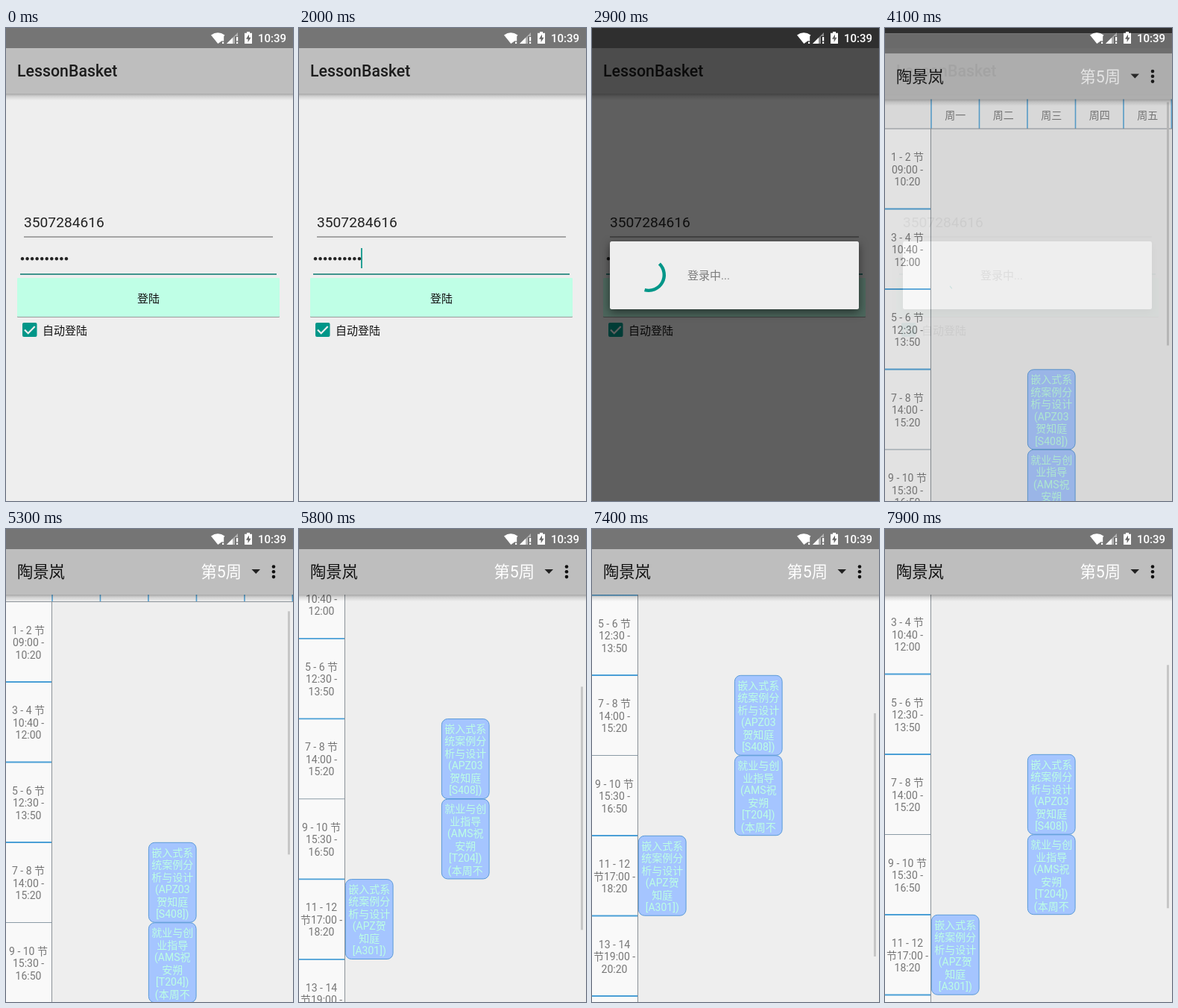
These frames come from a looping animation (385x634 px, 8000 ms). An HTML page:

```html
<!DOCTYPE html>
<html lang="zh-CN">
<head>
<meta charset="utf-8">
<style>
  html, body { margin: 0; width: 100%; height: 100%; overflow: hidden; background: #eee; }
  svg { display: block; width: 100vw; height: 100vh; }
  text { font-family: Roboto, "Noto Sans CJK SC", "Noto Sans CJK", sans-serif; white-space: pre; }
  .label { font-size: 14px; fill: #777; text-anchor: middle; }
  .course { font-size: 14px; fill: #bcffe4; text-anchor: middle; }
  #dialog > rect { filter: drop-shadow(0 4px 6px rgba(0, 0, 0, .5)); }
</style>
</head>
<body>
<svg viewBox="0 0 385 634" xmlns="http://www.w3.org/2000/svg">
  <defs>
    <linearGradient id="shade" x2="0" y2="1">
      <stop offset="0" stop-color="#000" stop-opacity=".3"/>
      <stop offset=".4" stop-color="#000" stop-opacity=".12"/>
      <stop offset="1" stop-color="#000" stop-opacity="0"/>
    </linearGradient>
    <g id="bars">
      <rect width="385" height="27" fill="#757575"/>
      <rect y="27" width="385" height="61" fill="#bebebe"/>
      <rect y="88" width="385" height="9" fill="url(#shade)"/>
    </g>
  </defs>

  <g id="login">
    <rect width="385" height="634" fill="#eee"/>
    <use href="#bars"/>
    <text x="15" y="65" font-size="21.3" font-weight="500" fill="#1c1c1c">LessonBasket</text>
    <text x="24" y="267" font-size="19.2" fill="#222">3507284616</text>
    <path d="M24 280H358" stroke="#8c8c8c" stroke-width="1.3"/>
    <g id="dots" fill="#222"></g>
    <path d="M19 330H363" stroke="#3f958d" stroke-width="2"/>
    <rect id="cursor" x="83" y="295" width="2" height="27" fill="#26a095"/>
    <rect id="button" x="15" y="335" width="352" height="52" rx="1" fill="#bfffe6"/>
    <text x="191" y="367.5" font-size="15" text-anchor="middle" fill="#111">登陆</text>
    <rect x="22" y="395" width="19.5" height="19" rx="2" fill="#009688"/>
    <path d="M25 404.5l4.7 4.7 9-9.2" fill="none" stroke="#eee" stroke-width="2.2"/>
    <text x="49" y="410.5" font-size="15" fill="#111">自动登陆</text>
  </g>

  <rect id="dim" width="385" height="634"/>
  <g id="dialog">
    <rect x="24" y="286" width="334" height="91" rx="2.5" fill="#eee"/>
    <path id="arc" fill="none" stroke="#009688" stroke-width="4.4"/>
    <text x="128" y="337" font-size="15" fill="#7c7c7c">登录中...</text>
  </g>

  <g id="table">
    <rect width="385" height="634" fill="#eee"/>
    <g id="grid"></g>
    <rect id="thumb" x="378" width="3" height="326" fill="#c6c6c6"/>
    <use href="#bars"/>
    <text x="15" y="65" font-size="21.3" fill="#111">陶景岚</text>
    <text x="261.5" y="65" font-size="21.3" fill="#fff">第5周</text>
    <path d="M329.5 54h11.5l-5.7 6z" fill="#222"/>
    <g fill="#111">
      <circle cx="359" cy="50.5" r="2.3"/><circle cx="359" cy="57.3" r="2.3"/><circle cx="359" cy="64.1" r="2.3"/>
    </g>
  </g>

  <g id="status" fill="#fff">
    <path d="M275 9.5Q284 3 293.5 9.5L290 14V17L284.3 21Z"/>
    <path d="M290 11h2.2v6.500h-2.2zM290 18.700h2.2v2.2h-2.2z"/>
    <path d="M296 21L311 6V11H307V21Z" fill-opacity=".45"/>
    <path d="M296 21L304 13V21ZM309 12h2.200v5.500h-2.200zM309 18.700h2.200v2.200h-2.200z"/>
    <path d="M323 5h4v1.700h3V21h-10V6.700h3z"/>
    <path d="M326 8.500l-4 6.300h2.600v4.200l4-6.300H326z" fill="#666"/>
    <text x="338" y="19.300" font-size="15" font-weight="500">10:39</text>
  </g>
</svg>
<script>
  const $ = id => document.getElementById(id);
  const LOOP = 8000, STEP = 100;
  const TOP = 127.5, ROW = 107.5, LEFT = 62, COL = 64.5, LINE = 16.5;

  const lines = (cls, x, y, list) => list.map((s, i) =>
    `<text class="${cls}" x="${x}" y="${y + i * LINE}">${s}</text>`).join('');

  const periods = [
    ['1 - 2 节', '09:00 -', '10:20'], ['3 - 4 节', '10:40 -', '12:00'],
    ['5 - 6 节', '12:30 -', '13:50'], ['7 - 8 节', '14:00 -', '15:20'],
    ['9 - 10 节', '15:30 -', '16:50'], ['11 - 12', '节17:00 -', '18:20'],
    ['13 - 14', '节19:00 -', '20:20'], ['15 - 16', '节20:30 -', '21:50']
  ];
  const design = ['嵌入式系', '统案例分', '析与设计'];
  const courses = [
    { col: 2, row: 3, text: [...design, '(APZ03', '贺知庭', '[S408])'] },
    { col: 2, row: 4, text: ['就业与创', '业指导', '(AMS祝', '安朔', '[T204])', '(本周不'] },
    { col: 0, row: 5, text: [...design, '(APZ贺', '知庭', '[A301])'] }
  ];

  function buildGrid() {
    const end = TOP + ROW * periods.length;
    let out = `<rect y="${TOP}" width="61" height="${end - TOP}" fill="#f9f9f9"/>`;
    [...'一二三四五'].forEach((day, i) => {
      const x = LEFT + i * COL;
      out += `<path d="M${x} 87V${TOP}" stroke="#55a5d8" stroke-width="1.6"/>` +
        `<text class="label" x="${x + COL / 2}" y="114">周${day}</text>`;
    });
    out += `<path d="M384.3 87V${TOP}" stroke="#55a5d8" stroke-width="1.4"/>` +
      `<path d="M0 ${TOP}H385M61.5 ${TOP}V${end}" stroke="#8b9298"/>`;
    periods.forEach((p, i) => {
      const y = TOP + i * ROW;
      out += lines('label', 30, y + 43, p);
      if (i) out += `<path d="M0 ${y}H61" stroke="${i === 4 ? '#8b9ba6' : '#4a9fd6'}" stroke-width="${i === 4 ? 1 : 1.8}"/>`;
    });
    for (const { col, row, text } of courses) {
      const x = LEFT + col * COL, y = TOP + row * ROW;
      out += `<rect x="${x + .4}" y="${y + .3}" width="${COL - .8}" height="${ROW - .6}" rx="8" fill="#a5c5ff" stroke="#5a9ad8"/>` +
        lines('course', x + COL / 2, y + 18.5, text);
    }
    $('grid').innerHTML = out;
  }

  // Piecewise linear track of [time, value] points.
  function track(points, t) {
    const i = points.findIndex(p => p[0] > t);
    if (i === 0) return points[0][1];
    if (i < 0) return points[points.length - 1][1];
    const [t0, a] = points[i - 1], [t1, b] = points[i];
    return a + (b - a) * (t - t0) / (t1 - t0);
  }

  // cubic-bezier(.4, 0, .2, 1)
  function ease(x) {
    if (x <= 0) return 0;
    if (x >= 1) return 1;
    let lo = 0, hi = 1, u;
    for (let i = 0; i < 20; i++) {
      u = (lo + hi) / 2;
      const bx = 1.2 * u * (1 - u) ** 2 + .6 * u * u * (1 - u) + u ** 3;
      if (bx < x) lo = u; else hi = u;
    }
    return u * u * (3 - 2 * u);
  }

  function spinner(ms) {
    const cycle = 1333, p = ms % cycle / cycle;
    const base = p * 90 + ms * .108 - 90;
    const from = base + 270 * ease(p * 2 - 1);
    const to = Math.max(from + 3, base + 270 * ease(p * 2));
    const at = deg => {
      const a = deg * Math.PI / 180;
      return `${(76 + 20.8 * Math.cos(a)).toFixed(2)} ${(331 + 20.8 * Math.sin(a)).toFixed(2)}`;
    };
    return `M${at(from)}A20.8 20.8 0 ${to - from > 180 ? 1 : 0} 1 ${at(to)}`;
  }

  const scrollPath = [[5200, 0], [5300, 30], [6000, 262], [6200, 308], [6400, 320],
    [7000, 320], [7100, 307], [7400, 254], [7900, 148]];
  const fadeIn = [[2600, 0], [2700, .4], [2800, .85], [2900, 1]];
  const enter = [[3900, 0], [4000, .4], [4100, .85], [4200, 1]];
  const thumbFade = [[4700, 1], [4800, .5], [4900, 0], [5200, 0], [5300, 1]];

  const blink = [200, 700, 1100, 1600, 2000, 2500];

  function render(t) {
    const pressed = t >= 2400 && t < 2800;
    $('cursor').style.opacity = blink.filter(b => b <= t).length % 2;
    $('button').style.filter = pressed
      ? 'drop-shadow(0 2px 1.5px rgba(0,0,0,.4))'
      : 'drop-shadow(0 1px .7px rgba(0,0,0,.35))';

    const shown = track(fadeIn, t);
    $('dim').style.opacity = shown * .6;
    $('dialog').style.opacity = shown;
    // The spinner stalls while the next screen loads.
    const spin = t >= 3800 ? 3800 : t >= 3600 ? 3600 : t;
    $('arc').setAttribute('d', spinner(Math.max(0, 250 + (spin - 2900) * 1.19)));

    const open = track(enter, t), scroll = track(scrollPath, t);
    $('table').style.display = open ? '' : 'none';
    $('table').style.opacity = open;
    $('table').setAttribute('transform', `translate(0 ${(1 - open) * 50})`);
    $('grid').setAttribute('transform', `translate(0 ${-scroll})`);
    $('thumb').setAttribute('y', 92 + scroll * .61);
    $('thumb').style.opacity = track(thumbFade, t);
  }

  function tick() {
    const t = performance.now() % LOOP;
    render(Math.floor(t / STEP) * STEP);
    requestAnimationFrame(tick);
  }

  $('dots').innerHTML = Array.from({ length: 10 }, (_, i) =>
    `<circle cx="${22 + i * 6.55}" cy="309.3" r="2.2"/>`).join('');
  buildGrid();
  tick();
</script>
</body>
</html>
```
